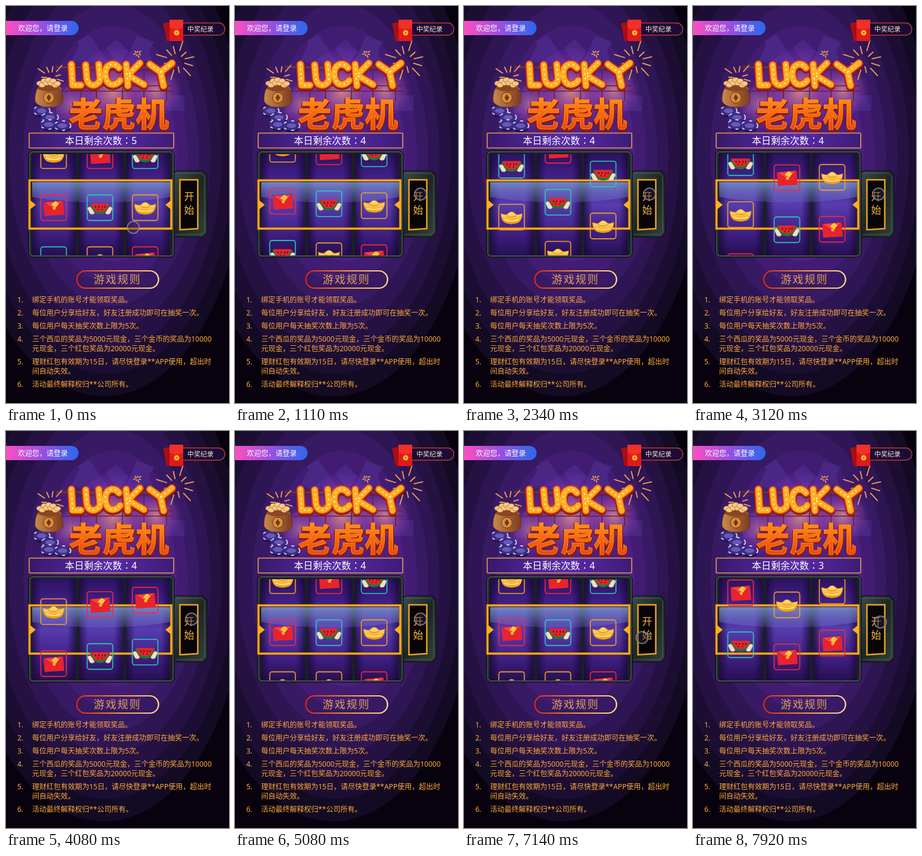
An HTML page for the animation above (8 s loop, 375 by 667 pixels).

```html
<!DOCTYPE html>
<html lang="zh-CN">
<head>
<meta charset="utf-8">
<title>老虎机</title>
<style>
html, body { margin: 0; width: 100%; height: 100%; overflow: hidden; background: #08020f; }
svg { display: block; width: 375px; height: 667px; }
text { font-family: "Noto Sans", "Noto Sans CJK SC", "Noto Sans CJK", sans-serif; }
.rules { font-size: 12px; font-weight: 500; fill: #ffab36; }
</style>
</head>
<body>
<svg viewBox="0 0 375 667" xmlns="http://www.w3.org/2000/svg">
<defs>
  <linearGradient id="hello"><stop offset="0" stop-color="#fb4fc4"/><stop offset=".5" stop-color="#9a4fe0"/><stop offset="1" stop-color="#2a68ee"/></linearGradient>
  <linearGradient id="rim"><stop offset="0" stop-color="#e0260f"/><stop offset=".5" stop-color="#f59a2c"/><stop offset="1" stop-color="#ffe08a"/></linearGradient>
  <linearGradient id="rim2"><stop offset="0" stop-color="#e0260f"/><stop offset="1" stop-color="#a8443c"/></linearGradient>
  <linearGradient id="count"><stop offset="0" stop-color="#36196c"/><stop offset=".55" stop-color="#5a2db0"/><stop offset="1" stop-color="#3a1b74"/></linearGradient>
  <linearGradient id="gold" x2="0" y2="1"><stop offset="0" stop-color="#ffe27a"/><stop offset="1" stop-color="#f19a12"/></linearGradient>
  <linearGradient id="fire" x2="0" y2="1"><stop offset="0" stop-color="#ffa51e"/><stop offset=".5" stop-color="#f8690f"/><stop offset="1" stop-color="#e23a10"/></linearGradient>
  <linearGradient id="drum" x2="0" y2="1">
    <stop offset="0" stop-color="#2c1360"/><stop offset=".25" stop-color="#43208c"/><stop offset=".5" stop-color="#563cae"/>
    <stop offset=".75" stop-color="#432189"/><stop offset="1" stop-color="#261052"/>
  </linearGradient>
  <linearGradient id="side"><stop offset="0" stop-color="#150732" stop-opacity=".7"/><stop offset=".2" stop-color="#150732" stop-opacity="0"/><stop offset=".8" stop-color="#150732" stop-opacity="0"/><stop offset="1" stop-color="#150732" stop-opacity=".7"/></linearGradient>
  <linearGradient id="gloss" x2="0" y2="1"><stop offset="0" stop-color="#86b4dc" stop-opacity=".68"/><stop offset="1" stop-color="#7b83d6" stop-opacity=".22"/></linearGradient>
  <linearGradient id="metal" x2="1" y2="1"><stop offset="0" stop-color="#3d4b4b"/><stop offset=".5" stop-color="#1d2625"/><stop offset="1" stop-color="#33413b"/></linearGradient>
  <linearGradient id="pouch"><stop offset="0" stop-color="#c98a4c"/><stop offset="1" stop-color="#7c3c20"/></linearGradient>
  <radialGradient id="glow"><stop offset="0" stop-color="#f2a08a" stop-opacity=".75"/><stop offset=".5" stop-color="#c05cb0" stop-opacity=".4"/><stop offset="1" stop-color="#8a3fc0" stop-opacity="0"/></radialGradient>
  <clipPath id="window"><path d="M44 249H276V419H44Z"/></clipPath>

  <g id="ingot">
    <rect x="-21.5" y="-21.5" width="43" height="43" rx="4" fill="none" stroke="#f5a21c" stroke-width="1.6"/>
    <path d="M-18-6Q-10-3-7-5Q0-13 7-5Q10-3 18-6Q17 8 9 10Q0 13-9 10Q-17 8-18-6Z" fill="url(#gold)" stroke="#d98306" stroke-width=".8"/>
    <path d="M-9-3Q0 3 9-3" fill="none" stroke="#d98306"/>
    <path d="M-12 4Q0 9 12 4" fill="none" stroke="#fff0a0" stroke-width="1.4"/>
  </g>
  <g id="packet">
    <rect x="-21.5" y="-21.5" width="43" height="43" rx="4" fill="none" stroke="#fb2638" stroke-width="1.6"/>
    <path d="M-17-9L16-12L18 12L-15 14Z" fill="#e8232f"/>
    <path d="M-17-9L16-12L1 3Z" fill="#f6404a" stroke="#b0101c" stroke-width=".8"/>
    <path d="M-4-5L3-11L9-7L4 0Z" fill="#ffc63a"/>
    <circle cx="1" cy="1" r="2.6" fill="#ffb320"/>
  </g>
  <g id="melon">
    <rect x="-21.5" y="-21.5" width="43" height="43" rx="4" fill="none" stroke="#27cdb6" stroke-width="1.6"/>
    <path d="M-17-6H17Q13 11 0 11Q-13 11-17-6Z" fill="#1c7a35"/>
    <path d="M-15-7H15Q11 7 0 7Q-11 7-15-7Z" fill="#e5262c"/>
    <path d="M-8-3l1 3M-2-3v3M4-3v3M9-3l-1 3M-4 2l1 2M3 2v2" stroke="#300c10" stroke-width="1.5"/>
    <path d="M-21 1q4-5 7 0l5 8q-3 4-8 1ZM21 1q-4-5-7 0l-5 8q3 4 8 1Z" fill="#f4dcc8" stroke="#b89078" stroke-width=".6"/>
  </g>
  <path id="lucky" d="M110 98L112 133H126M134 99L136 122Q138 133 148 133Q159 130 158 120L156 98M190 104Q185 97 177 98Q166 101 167 116Q169 132 180 132Q188 131 192 125M202 98L205 134M225 96L205 116L232 132M242 98L260 111L279 96M260 111L265 134"/>
</defs>

<g id="sky"></g>
<g fill="#6a4fc0" opacity=".22">
  <path d="M110 92L128 56L150 72L140 100ZM168 70L186 56L206 76L190 100ZM214 68L238 66L246 92L220 94ZM246 150H300V176H246ZM84 150L110 130V180H84Z"/>
  <path d="M120 60L190 150L250 60L220 50L190 120L140 48Z"/>
</g>
<circle cx="180" cy="145" r="72" fill="url(#glow)"/>
<circle cx="252" cy="142" r="46" fill="url(#glow)"/>
<circle cx="112" cy="165" r="44" fill="url(#glow)" opacity=".7"/>

<g stroke="#5a2440" stroke-width="1.6" fill="none">
  <path d="M82 100H285M82 108H285M92 134H282M92 143H282M126 92V160M152 92V160M196 92V160M232 92V160M270 96V160"/>
  <path d="M84 103H284" stroke="#a25430" stroke-width="1"/>
</g>
<g id="sparks" stroke="#f0a456" stroke-width="1.8" stroke-linecap="round"></g>

<g stroke-linecap="round" stroke-linejoin="round" fill="none">
  <use href="#lucky" stroke="#8e1a14" stroke-width="15" y="2"/>
  <use href="#lucky" stroke="#e8481a" stroke-width="13"/>
  <use href="#lucky" stroke="#fdb022" stroke-width="9.5"/>
  <use href="#lucky" stroke="#fff6cf" stroke-width="2.6" stroke-dasharray="0 8"/>
</g>
<g font-size="56" font-weight="900">
  <text x="106" y="204" fill="#8e1a14" stroke="#8e1a14" stroke-width="4" stroke-linejoin="round">老虎机</text>
  <text x="106" y="202" fill="url(#fire)" stroke="#ff8c1e" stroke-width="1">老虎机</text>
</g>

<g id="chips"></g>
<g>
  <path d="M53 138Q72 130 91 138Q98 150 95 163Q88 171 70 170Q53 169 49 160Q48 147 53 138Z" fill="url(#pouch)" stroke="#6b3118" stroke-width=".8"/>
  <path d="M53 139Q72 148 92 139L88 133H56Z" fill="#8a4522"/>
  <g id="coins" fill="#f8c98a" stroke="#b06a1c" stroke-width=".8"></g>
  <circle cx="72" cy="154" r="9" fill="#d89038" stroke="#6d2f16"/>
  <path d="M72 148l4 6-4 6-4-6Z" fill="#7c3518"/>
</g>

<path d="M0 25H110A12 12 0 0 1 110 49H0Z" fill="url(#hello)"/>
<text x="20" y="41.5" font-size="12" fill="#fff">欢迎您，请登录</text>
<rect x="268" y="28.500" width="100" height="20.500" rx="10" fill="#1c0b36" stroke="url(#rim2)" stroke-width="1.4"/>
<text x="305" y="42.500" font-size="11" font-weight="500" fill="#fbe6d8">中奖纪录</text>
<path d="M264 29L284 25L290 56L270 59Z" fill="#a80e14"/>
<path d="M275 23H298V59H275Z" fill="#df1a1c"/>
<path d="M275 23H298V36Q287 43 275 36Z" fill="#f0302a"/>
<circle cx="287" cy="45" r="4.500" fill="#fbb62c"/><circle cx="287" cy="45" r="1.500" fill="#c9690e"/>

<rect x="39" y="213.500" width="243" height="25" rx="1" fill="url(#count)" fill-opacity=".85" stroke="#e59c48" stroke-width="1.6"/>
<text x="99" y="232" font-size="16" fill="#fff">本日剩余次数<tspan lang="zh-Hant">：</tspan><tspan id="left">5</tspan></text>

<path d="M281 280L288 277H331L338 284V381L331 388H281Z" fill="url(#metal)" stroke="#101616" stroke-width="1.5"/>
<path d="M285 281H329L334 286V379L329 384H285" fill="none" stroke="#4f625c"/>
<path d="M292.500 292H322.500V374L292.500 376Z" fill="#080508" stroke="#eaa31e" stroke-width="2.5"/>
<g font-size="17" fill="#f3b544" text-anchor="middle"><text x="308" y="326">开</text><text x="308" y="349">始</text></g>

<path d="M43 243H278L283 248V417L278 422H43L38 417V248Z" fill="#1a2024" stroke="#0c1013"/>
<path d="M43.500 245H277.500L281 248.500V416.500L277.500 420H43.500L40 416.500V248.500Z" fill="none" stroke="#52605f" stroke-width="1.3"/>
<g id="drums"></g>
<path d="M44 296H276V321Q160 340 44 321Z" fill="url(#gloss)"/>
<rect x="39.500" y="293" width="238.500" height="81" fill="none" stroke="#b86508" stroke-width="4.200"/>
<rect x="39.500" y="293" width="238.500" height="81" fill="none" stroke="#fbb01c" stroke-width="2.600"/>
<path d="M39 325L50 334L39 343ZM279 325L268 334L279 343Z" fill="#fbb01c"/>
<g id="reels" clip-path="url(#window)"></g>

<rect x="119" y="445" width="137.500" height="29" rx="14.500" fill="none" stroke="url(#rim)" stroke-width="2.200"/>
<text x="147.500" y="465.500" font-size="18" letter-spacing="2" fill="#dda650">游戏规则</text>
<g id="rules" class="rules"></g>

<rect id="dim" width="375" height="667" opacity="0"/>
<g id="popup" opacity="0">
  <path d="M80 284Q88 268 104 263H274Q289 268 297 284L274 312H104Z" fill="#951600"/>
  <path d="M104 155H274V320H104Z" fill="#fff"/>
  <path d="M108 155H274" stroke="#271048" stroke-width="5" stroke-linecap="round" stroke-dasharray="0 9"/>
  <path d="M108 255.500H270" stroke="#b9b5bd" stroke-dasharray="3 2"/>
  <circle cx="104" cy="255.500" r="4" fill="#43152a"/><circle cx="274" cy="255.500" r="4" fill="#43152a"/>
  <path d="M174 211V190Q175 180 187 180Q199 180 200 190V211Z" fill="#f2523a" stroke="#6a1c18" stroke-width="1.500"/>
  <path d="M174 193L167 204L171 208M200 193L207 204L203 208" fill="none" stroke="#6a1c18" stroke-width="2"/>
  <path d="M179 192H185M189 192H195M181 195V209M193 195V209" stroke="#fff" stroke-width="2.400"/>
  <path d="M183 202Q187 198 191 202" fill="none" stroke="#6a1c18" stroke-width="1.500"/>
  <text x="123.500" y="243.500" font-size="15.100" font-weight="500" fill="#241c24">好可惜，差点就中了</text>
  <text x="121" y="278.500" font-size="10" fill="#b4b1b6">别灰心、再试一次，好运就来了</text>
  <path d="M80 284Q187 346 297 284V437Q297 440 294 440H83Q80 440 80 437Z" fill="#ff4203"/>
  <path d="M166 316Q160 306 165 300Q169 307 175 308Q187 303 198 308Q205 306 208 300Q213 308 208 316Q214 333 204 341Q187 351 170 341Q160 332 166 316Z" fill="#ffc62c" stroke="#8c3a0a" stroke-width="1.600"/>
  <path d="M170 317L181 323M174 325L180 317M193 323L204 317M172 331Q188 344 203 329Q188 336 172 331Z" fill="#7a2c08" stroke="#7a2c08" stroke-width="2" stroke-linecap="round"/>
  <circle cx="197" cy="324" r="2.500" fill="#7a2c08"/>
  <circle cx="187.500" cy="533" r="30" fill="#cbc5cf" opacity=".82"/>
  <path d="M176 522L199 545M199 522L176 545" stroke="#1e1822" stroke-width="4" stroke-linecap="round"/>
</g>
<g id="cursor"><circle r="10" fill="#32283c" fill-opacity=".42" stroke="#8f8996" stroke-opacity=".8" stroke-width="2"/></g>
</svg>

<script>
const LOOP = 8000, PERIOD = 262, SPIN1 = 1000, SPIN2 = 7370;
const $ = id => document.getElementById(id);
const el = (parent, tag, attrs, text) => {
  const node = document.createElementNS('http://www.w3.org/2000/svg', tag);
  for (const k in attrs) node.setAttribute(k, attrs[k]);
  if (text) node.textContent = text;
  return parent.appendChild(node);
};
const clamp = x => Math.min(1, Math.max(0, x));
const ease = x => x * x * (3 - 2 * x);

// Static scenery
for (let i = 0; i < 7; i++) {
  const rx = 236 - i * 22;
  el($('sky'), 'ellipse', { cx: 165 + i * 3, cy: 250, rx, ry: rx * 1.72, fill: `hsl(${261 + i},${56 + i}%,${9 + i * 3.8}%)` });
}

function burst(cx, cy, size, rays) {
  for (let i = 0; i < rays; i++) {
    const a = i * 2 * Math.PI / rays + .3, r = size * (.78 + .22 * Math.sin(i * 2.3));
    const x = r * Math.cos(a), y = r * Math.sin(a);
    el($('sparks'), 'path', { d: `M${cx + x * .5} ${cy + y * .5}L${cx + x} ${cy + y}` });
  }
}
burst(287, 92, 36, 12);
burst(76, 120, 27, 11);
burst(221, 80, 7, 7);

for (const [x, y] of [[60, 176], [74, 187], [72, 199], [95, 201]]) {
  el($('chips'), 'ellipse', { cx: x, cy: y + 3, rx: 14, ry: 8, fill: '#1d1250' });
  el($('chips'), 'ellipse', { cx: x, cy: y, rx: 14, ry: 8, fill: '#3a2d86', stroke: '#d8cbe6', 'stroke-width': 2, 'stroke-dasharray': '5 8' });
  el($('chips'), 'ellipse', { cx: x, cy: y, rx: 8, ry: 4, fill: '#6a58b4' });
}
for (let i = 0; i < 9; i++)
  el($('coins'), 'ellipse', { cx: 57 + i * 3.7, cy: 130 - 6 * Math.sin(i * .4) + i % 2 * 5, rx: 5.5, ry: 4 });

const RULES = [
  [498, '1.', '绑定手机的账号才能领取奖品。'],
  [520, '2.', '每位用户分享给好友，好友注册成功即可在抽奖一次。'],
  [542, '3.', '每位用户每天抽奖次数上限为5次。'],
  [564, '4.', '三个西瓜的奖品为5000元现金，三个金币的奖品为10000'],
  [580, '', '元现金，三个红包奖品为20000元现金。'],
  [602, '5.', '理财红包有效期为15日，请尽快登录**APP使用，超出时'],
  [618, '', '间自动失效。'],
  [640, '6.', '活动最终解释权归**公司所有。']
];
for (const [y, no, line] of RULES) {
  if (no) el($('rules'), 'text', { x: 19, y }, no);
  el($('rules'), 'text', { x: 44, y }, line);
}

// Reels: each shows the same three symbols, shifted by one
const SYMBOLS = ['#ingot', '#packet', '#melon'];
const reels = [80, 158, 234].map((x, r) => {
  for (const fill of ['url(#drum)', 'url(#side)'])
    el($('drums'), 'rect', { x: 44 + r * 79, y: 248, width: 73.5, height: 171, rx: 3, fill });
  return SYMBOLS.map((_, k) => el($('reels'), 'use', { x, href: SYMBOLS[(r + k) % 3] }));
});

// Upward distance travelled by each reel at the key times of a spin
const TIMES = [SPIN1, 1660, 3120, 4080, 5080];
const TRAVEL = [
  [0, 243, 1211, 1520, 1572],
  [0, 159, 1011, 1270, 1310],
  [0, 92, 1099, 1452, 1572]
];
const SECOND = [67, 134, 70];

function travel(r, t) {
  const d = TRAVEL[r];
  if (t >= SPIN2) return SECOND[r] * clamp((t - SPIN2) / 550) ** 2;
  if (t <= SPIN1 || t >= TIMES[4]) return 0;
  // Gentle start and stop, never running backwards
  const speed = i => (d[i + 1] - d[i]) / (TIMES[i + 1] - TIMES[i]);
  const slope = i => i % 4 ? 2 / (1 / speed(i - 1) + 1 / speed(i)) : 0;
  const i = TIMES.findIndex(k => k > t) - 1;
  const h = TIMES[i + 1] - TIMES[i], u = (t - TIMES[i]) / h, v = 1 - u;
  return d[i] * v * v * (1 + 2 * u) + d[i + 1] * u * u * (3 - 2 * u)
    + h * u * v * (slope(i) * v - slope(i + 1) * u);
}

const CURSOR = [[0, 214, 372], [810, 312, 316], [5640, 312, 316], [6290, 189, 533], [6480, 189, 533], [7210, 315, 321], [LOOP, 315, 321]];
function cursorAt(t) {
  const i = CURSOR.findIndex(k => k[0] > t), [t0, x0, y0] = CURSOR[i - 1], [t1, x1, y1] = CURSOR[i];
  const u = ease((t - t0) / (t1 - t0));
  return [x0 + (x1 - x0) * u, y0 + (y1 - y0) * u];
}

// The picture updates at these moments only: [first, last, count]
const TICKS = [0, ...[
  [140, 810, 6], [1110, 1660, 5], [1780, 2060, 3], [2190, 3120, 8], [3240, 4080, 7],
  [4230, 4230, 1], [4390, 5080, 6], [5480, 6290, 7], [6570, 7530, 7], [7650, 7920, 3]
].flatMap(([a, b, n]) => Array.from({ length: n }, (_, i) => a + (n > 1 ? (b - a) * i / (n - 1) : 0)))];

function draw(now) {
  const time = now % LOOP, t = TICKS.filter(k => k <= time + .01).pop();

  reels.forEach((items, r) => items.forEach((item, k) => {
    const y = 51.5 + k * PERIOD / 3 - travel(r, t);
    item.setAttribute('y', 200 + (y % PERIOD + PERIOD) % PERIOD);
  }));
  reels[0][2].setAttribute('href', t >= 5080 && t < SPIN2 ? '#ingot' : '#melon');
  $('left').textContent = t < SPIN1 ? 5 : t < SPIN2 ? 4 : 3;

  const show = t < 6500 ? clamp((t - 5380) / 360) : clamp((6700 - t) / 260);
  const s = .6 + .4 * ease(show);
  $('dim').setAttribute('opacity', .32 * show);
  $('popup').setAttribute('opacity', show);
  $('popup').setAttribute('transform', `translate(187.5 333) scale(${s}) translate(-187.5 -333)`);

  $('cursor').setAttribute('transform', `translate(${cursorAt(t)})`);
}

(function frame() {
  draw(performance.now());
  requestAnimationFrame(frame);
})();
</script>
</body>
</html>
```
